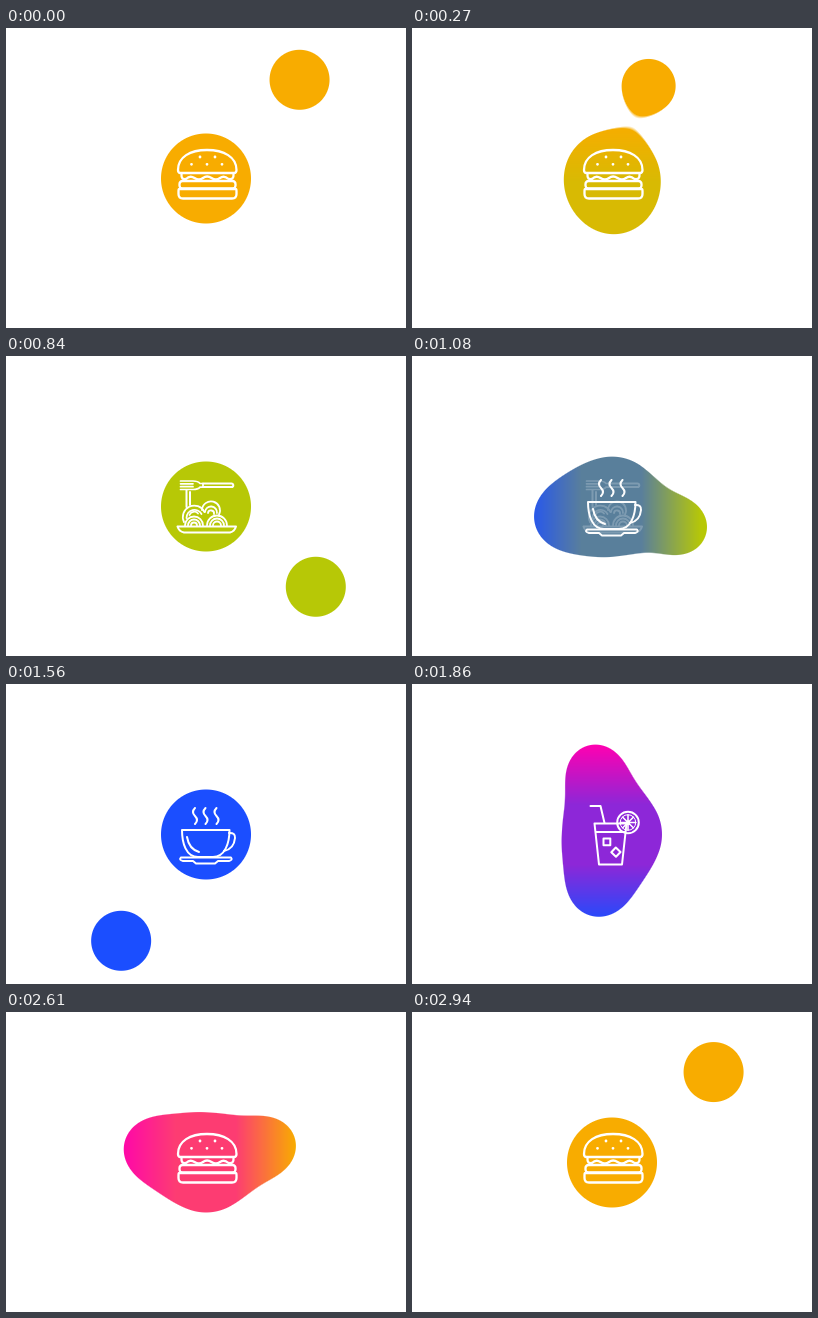
These frames come from a looping animation (400 by 300 pixels, 2970 ms). An HTML page with a canvas:

```html
<!DOCTYPE html>
<html lang="en">
<head>
<meta charset="utf-8">
<title>Menu blobs</title>
<style>
  html, body { margin: 0; width: 100%; height: 100%; overflow: hidden; background: #fff; }
  canvas, svg { position: absolute; left: 0; top: 0; width: 400px; height: 300px; }
  svg { fill: none; stroke: #fff; stroke-width: 2; stroke-linecap: round; stroke-linejoin: round; }
</style>
</head>
<body>
<canvas id="stage" width="400" height="300"></canvas>
<svg viewBox="0 0 400 300">
  <!-- burger -->
  <g stroke-width="2.3">
    <path d="M174.5 145H228Q230.500 145 230.500 142C230.500 129 218 122 201 122S172 129 172 142Q172 145 174.500 145Z"/>
    <path d="M194 129h.01M209 129h.01M185.500 136.300h.01M201 136.300h.01M216 136.300h.01" stroke-width="2.800"/>
    <path d="M175.500 146.500Q175 152 180 151Q184 147 188.500 150T197 150T205.500 150T214 150T222.500 151Q228 152 227.500 146.500"/>
    <rect x="173.500" y="153" width="56" height="7.500" rx="3"/>
    <path d="M173.500 161H229.500Q230.500 161 230.500 163V166Q230.500 170.500 226 170.500H177Q172.500 170.500 172.500 166V163Q172.500 161 173.500 161Z"/>
  </g>
  <!-- pasta -->
  <g>
    <path d="M197 127.500H225.500A1.800 1.800 0 0 1 225.500 131.100H197"/>
    <path d="M174.500 125H187Q192 125 194 127.500H197V131.100H194Q192 133.500 187 133.500H174.500M174.500 127.800H187M174.500 130.700H187" stroke-width="1.700"/>
    <path d="M180.500 134V151M184 136V149"/>
    <path d="M178 166A11 11 0 1 1 198.500 156M180.500 162A8 8 0 0 1 195.500 158M183.500 159A5 5 0 0 1 192 157.500" stroke-width="1.800"/>
    <path d="M179 169.500A9 9 0 0 1 197 169.500M182 169.500A6 6 0 0 1 194 169.500M185 169.500A3 3 0 0 1 191 169.500" stroke-width="1.800"/>
    <path d="M196 154A9 9 0 1 1 213 158.500M199 156A6 6 0 0 1 211 157M202 157A3 3 0 0 1 208 158" stroke-width="1.800"/>
    <path d="M201 169.500A10 10 0 0 1 221 169.500M204 169.500A7 7 0 0 1 218 169.500M207 169.500A4 4 0 0 1 215 169.500" stroke-width="1.800"/>
    <path d="M171.500 170.500H230Q228.500 175.500 224 176.500H178Q173 175.500 171.500 170.500Z"/>
  </g>
  <!-- coffee -->
  <g>
    <path d="M189 124q-4 4 0 8t0 8M199.500 124q-4 4 0 8t0 8M210.500 124q-4 4 0 8t0 8"/>
    <path d="M176 146H223.500C223.500 159 219 173 207 173H192C180 173 176 159 176 146Z"/>
    <path d="M223 149Q229.500 148.500 229 154Q228 165 218 167M181 153Q183 165 193 168"/>
    <path d="M175 173.500H225Q227 176 223 177H212L209 179.500H190L187 177H177Q172.500 176 175 173.500Z"/>
  </g>
  <!-- iced drink -->
  <g>
    <path d="M178.500 122H188.500L192.500 139"/>
    <path d="M182.500 139.500H214.500L210 180.500H187ZM184 148H213.500"/>
    <circle cx="216" cy="138.500" r="10.800"/>
    <circle cx="216" cy="138.500" r="7.800" stroke-width="1"/>
    <path d="M208.500 138.500H223.500M216 131V146M210.700 133.200L221.300 143.800M221.300 133.200L210.700 143.800" stroke-width="1.600"/>
    <path d="M191.500 154.500h6.800v6.800h-6.800ZM203.800 163.500l4.700 4.500-4.500 4.700-4.700-4.500Z"/>
  </g>
</svg>
<script>
const LOOP = 2970, STEP = 30, W = 400, H = 300, CX = 200, CY = 150.5;
const COLORS = [[248, 172, 0], [183, 200, 6], [27, 78, 255], [255, 0, 176]];
const MIDS = [.35, .5, .6, .5];               // share of the new colour mid-blend
const STARTS = [-399, 351, 1101, 1851, 2601]; // when each colour takes over
const GOO = 45, REACH = 136;

const ctx = stage.getContext('2d');
const image = ctx.createImageData(W, H);
const icons = document.querySelectorAll('g');

const clamp = (x, lo = 0, hi = 1) => Math.min(hi, Math.max(lo, x));
const rad = deg => deg * Math.PI / 180;
const ease = p => (1 - Math.cos(Math.PI * clamp(p))) / 2;
const mix = (a, b, p) => a.map((v, i) => v + (b[i] - v) * p);

// A drop leaves the centre, drifts counterclockwise and falls back in.
function drop(age, kind) {
  const d = REACH * ease(Math.min(age + 200, 950 - age) / 430);
  const a = rad(90 * kind - 45 - .081 * (age - 380));
  const r = 27 * Math.min(1, d / 40) + 3 * clamp((d - 117) / 16);
  return { x: CX + d * Math.cos(a), y: CY + d * Math.sin(a), r };
}

function smoothMin(a, b) {
  const h = Math.max(GOO - Math.abs(a - b), 0) / GOO;
  return Math.min(a, b) - h * h * GOO / 4;
}

function draw(t) {
  const ages = STARTS.map(s => t - s);
  const now = ages.findIndex(a => Math.abs(a) <= 375 || (a > 0 && a < 400));
  const age = ages[now], kind = now % 4, old = (kind + 3) % 4;
  const balls = ages.flatMap((a, i) => a > -200 && a < 950 ? [drop(a, i % 4)] : []);
  const core = 45 + 5 * Math.max(0, 1 - (age / 130) ** 2);

  const from = COLORS[old], to = COLORS[kind], mid = mix(from, to, MIDS[kind]);
  const ux = Math.cos(rad(90 * kind)), uy = Math.sin(rad(90 * kind));
  const shift = -140 * clamp(age / 129, -1, 1) ** 3;

  const px = image.data;
  px.fill(0);
  for (let y = 0; y < H; y++) for (let x = 0; x < W; x++) {
    const dx = x + .5 - CX, dy = y + .5 - CY;
    let d = Math.hypot(dx, dy) - core;
    for (const b of balls) d = smoothMin(d, Math.hypot(x + .5 - b.x, y + .5 - b.y) - b.r);
    if (d >= .5) continue;
    // The blend stays flat in the middle and colours only the lobes.
    const u = dx * ux + dy * uy - shift;
    const end = u < 0 ? from : to, p = clamp((Math.abs(u) - 30) / 60), i = (y * W + x) * 4;
    for (let c = 0; c < 3; c++) px[i + c] = mid[c] + (end[c] - mid[c]) * p;
    px[i + 3] = 255 * clamp(.5 - d);
  }
  ctx.putImageData(image, 0, 0);

  icons.forEach((icon, i) => {
    icon.style.opacity = i === kind ? clamp((age + 70) / 50)
      : i === old ? clamp((-age - 10) / 50) : 0;
  });
}

const begin = performance.now();
function tick() {
  const t = (performance.now() - begin) % LOOP;
  draw(Math.floor(t / STEP) * STEP);
  requestAnimationFrame(tick);
}
tick();
</script>
</body>
</html>
```
